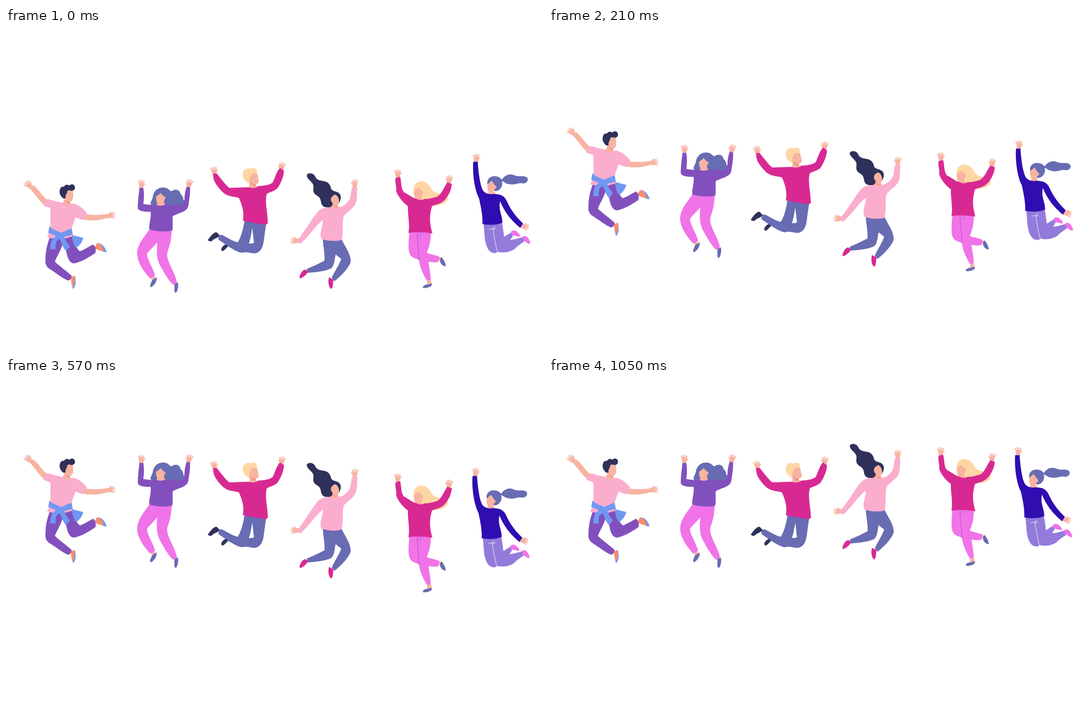
Write an HTML page that moves like this. It is 966x580 px and loops after 1.08 s.

```html
<!DOCTYPE html>
<html lang="en">
<head>
<meta charset="utf-8">
<title>Jumping friends</title>
<style>
  @property --step { syntax: "<number>"; inherits: true; initial-value: 0; }
  @keyframes tick { to { --step: 36; } }
  html, body { margin: 0; width: 100%; height: 100%; overflow: hidden; background: #fff; }
  svg { display: block; width: 966px; height: 580px; animation: tick 1080ms steps(36) infinite; }

  /* Each figure rises evenly for --n steps of 30 ms, then rests. */
  .fig {
    --x: 0;
    --p: min(1, var(--step) / var(--n));
    transform: translate(calc(var(--x) * 1px * var(--p)), calc(var(--y) * -1px * var(--p)));
  }

  .skin { fill: #f8b3a1; }
  .pink { fill: #fbadce; }
  .dark { fill: #2f315a; }
  .purple { fill: #8250bd; }
  .sky { fill: #7098f2; }
  .orange { fill: #ff8d68; }
  .slate { fill: #686cb3; }
  .orchid { fill: #f073e8; }
  .crimson { fill: #d82993; }
  .blond { fill: #fed6a4; }
  .navy { fill: #2f0db1; }
  .lilac { fill: #937bdb; }
  .shade { fill: #ef947f; }
  .seam { fill: none; stroke-width: .8; stroke-linecap: round; }
  #hand path + path { fill: none; stroke: #f8b3a1; stroke-width: 2; stroke-linecap: round; }
</style>
</head>
<body>
<svg viewBox="0 0 966 580" xmlns="http://www.w3.org/2000/svg">
  <defs>
    <g id="hand">
      <path class="skin" d="M-3.200 3C-3-1-5.200-4-4.400-8Q0-10.500 4-8C4.800-4 3-1 3.200 3Z"/>
      <path d="M-3.400-7.500L-5.400-12M-1.300-8L-2-13.500M1.100-8L1.600-13.800M3.100-7.500L4.700-12M3-4L6.200-7.500"/>
    </g>
  </defs>

  <!-- Man with a shirt tied at the waist -->
  <g class="fig" style="--y:136.500;--n:10">
    <use href="#hand" transform="translate(45.500 287) rotate(-48)"/>
    <use href="#hand" transform="translate(182 339) rotate(80) scale(-1 1)"/>
    <path class="skin" d="M43 289L49 283C58 290 66 304 76 311L71 321C60 312 53 300 43 289Z"/>
    <path class="skin" d="M139 334C150 338 168 337 183 335L185 341C170 347 150 349 132 343Z"/>
    <path class="orange" d="M116 449L124 446C126 456 124 464 121 469C117 464 118 455 116 449Z"/>
    <path class="sky" d="M124 447C126 456 126 465 121 470L119.500 468C123 463 124 455 124 447Z"/>
    <path class="orange" d="M158 397L164 387C171 390 177 396 180 403C172 403 166 399 158 397Z"/>
    <path class="sky" d="M166 387C174 389 179 396 181 404L174 403C178 400 173 393 166 387Z"/>
    <path class="purple" d="M79 376C74 390 71 402 71 417C70 427 74 431 80 435C91 442 102 451 112 455Q118 453 118 446C108 437 95 428 88 421C91 412 97 404 101 392L105 386C109 400 109 424 123 424C137 421 151 412 161 405Q163 396 157 390C148 394 140 400 133 402C126 398 125 386 121 376Z"/>
    <path class="pink" d="M75 308C85 311 92 313 99 314C107 319 115 320 120 316C131 318 139 325 146 334C143 338 141 343 138 346L125 341C123 349 119 355 118 363L121 374C107 382 88 381 74 377C77 371 80 366 80 360V329L79 324L67 320C69 315 71 311 75 308Z"/>
    <g class="sky">
      <path d="M119 373C126 375 133 376 139 378C137 387 131 393 126 396C121 390 119 382 119 373Z"/>
      <path d="M118 361L120 372C112 375 106 375 102 377C96 380 90 384 90 387L89 399L79 398C80 391 81 385 83 381C91 372 104 366 118 361Z"/>
      <path d="M78 357C85 365 97 366 104 372C106 382 110 387 115 393L108 402C102 395 100 386 96 379C90 374 83 371 76 369Z"/>
    </g>
    <path class="skin" d="M105 303L115 308C113 312 114 315 118 317C114 321 105 320 101 315C105 312 105 308 105 303Z"/>
    <path class="shade" d="M107 309Q110 314 116 313L114 316Q108 315 107 309Z"/>
    <path class="skin" d="M106 295C109 289 119 289 120 293C122 303 121 312 115 313C109 313 106 307 106 295Z"/>
    <path class="dark" d="M103 307C98 303 95 297 97 291C98 286 102 285 104 286C106 282 111 281 114 284C117 280 123 281 124 286C125 291 121 294 117 293C112 291 109 294 110 297C107 300 107 304 107 307Z"/>
  </g>

  <!-- Woman in the purple sweater -->
  <g class="fig" style="--y:135;--n:15">
    <use href="#hand" transform="translate(243.500 288)"/>
    <use href="#hand" transform="translate(328 287) rotate(14) scale(-1 1)"/>
    <path class="slate" d="M261 319C258 313 264 309 264 304C266 291 277 285 288 288C293 290 295 294 298 294C304 289 313 291 314 299C318 302 319 306 319 309C325 313 321 322 312 320L295 323Z"/>
    <path class="skin" d="M273 309L284 309Q283 316 288 319Q279 325 270 319Q274 316 273 309Z"/>
    <path class="skin" d="M270 306C269 302 275 302 278 297C280 300 283 301 284 304C287 302 288 307 285 309C284 315 281 319 277 319C272 318 270 312 270 306Z"/>
    <path class="skin" d="M259 450L266 446L269 451L264 455ZM301 461L307 457L309 461L304 464Z"/>
    <path class="slate" d="M263 454Q267 452 271 449C272 455 268 463 261 467Q258 466 260 461ZM303 461Q306 460 309 458C311 464 309 473 306 477Q302 477 303 469Z"/>
    <path class="orchid" d="M259 361C252 373 235 389 236 408C237 424 248 438 258 450Q265 451 268 445C263 429 252 414 254 406C259 399 267 393 272 386C271 403 270 417 279 431C286 444 293 455 300 462Q307 462 307 455C302 437 288 419 290 405C295 391 298 379 298 363Z"/>
    <path class="purple" d="M240 288L247 288C249 299 248 309 247 317L263 319C269 317 272 320 278 320C282 320 285 318 290 318L310 319C320 320 320 316 321 310C321 302 322 294 325 286L331 287C332 298 329 313 328 320C326 332 309 333 300 339C299 348 301 357 299 365Q280 369 258 363C256 354 262 343 260 331C252 331 238 331 237 324C237 311 239 299 240 288Z"/>
  </g>

  <!-- Man in the crimson sweater -->
  <g class="fig" style="--y:100;--n:19">
    <use href="#hand" transform="translate(375.500 264) rotate(-10)"/>
    <use href="#hand" transform="translate(495 256) rotate(10) scale(-1 1)"/>
    <path class="dark" d="M363 382C368 375 374 367 379 368L385 374C380 379 374 379 370 384Q365 385 363 382ZM387 400C388 393 393 391 396 389L402 391C397 395 394 400 390 402Z"/>
    <path class="slate" fill-rule="evenodd" d="M429 346C427 362 423 376 417 386C407 384 396 376 387 372Q380 377 383 382C395 389 408 401 424 405C433 402 439 406 448 406C458 404 461 396 463 388L468 352ZM443 360L446 387Q441 389 437 388Q440 380 443 360Z"/>
    <path class="crimson" d="M373 262L379 262C387 272 396 284 402 288L432 287C441 287 449 288 453 285C464 284 475 283 480 278C484 269 487 258 493 252L500 257C500 267 494 281 488 289C481 295 472 296 469 299C465 315 471 332 471 352L468 354C455 353 440 350 426 347C429 333 425 319 419 306C409 303 399 304 390 296C381 286 371 276 373 262Z"/>
    <path class="skin" d="M437 272L450 279Q448 284 453 286Q444 290 437 287Q439 281 437 272Z"/>
    <path class="shade" d="M439 276Q442 281 450 282L448 285Q440 283 439 276Z"/>
    <path class="skin" d="M437 267C438 260 451 260 452 263L455 277C452 283 444 282 441 278C436 276 435 271 437 267Z"/>
    <path class="blond" d="M438 280C430 277 425 270 426 263C426 253 436 251 440 254C445 251 451 253 451 257C453 259 451 263 447 261C442 263 440 264 440 268C437 268 438 274 438 280Z"/>
  </g>

  <!-- Woman with long dark hair -->
  <g class="fig" style="--y:143;--n:25">
    <use href="#hand" transform="translate(627 287) rotate(4) scale(-1 1)"/>
    <use href="#hand" transform="translate(526.500 383.500) rotate(-88)"/>
    <path class="dark" d="M541 265C543 260 553 261 556 267C559 275 567 275 573 276C581 278 584 284 585 290C589 296 599 293 602 302C604 311 597 319 590 323L576 323C568 322 567 316 566 310C564 302 558 303 554 297C551 291 555 286 552 281C549 275 541 272 541 265Z"/>
    <path class="skin" d="M588 312L597 315Q595 320 600 323Q591 329 582 323Q589 321 588 312Z"/>
    <path class="shade" d="M588 318Q591 322 597 320L596 322Q590 324 588 318Z"/>
    <path class="skin" d="M585 312C583 306 587 302 592 300C598 302 601 311 598 317C595 323 589 321 587 315Z"/>
    <path class="crimson" d="M528 450C528 444 533 436 538 435L544 438C541 444 535 449 530 451ZM581 449L589 453C588 460 589 467 585 470C580 467 579 456 581 449Z"/>
    <path class="slate" d="M570 379C570 393 574 405 573 419C562 425 551 430 541 434L543 441C558 440 575 438 585 433C591 428 591 416 593 408L603 416C599 427 591 439 586 450L591 456C604 446 618 430 620 421C621 407 609 393 603 379Z"/>
    <path class="pink" d="M622 288L632 287C631 297 633 313 626 321C619 329 608 335 607 341C604 354 608 369 603 382Q587 386 567 380C563 368 571 355 570 346C558 354 543 378 529 389L523 383C535 371 549 345 560 332C566 324 576 323 585 323Q592 327 599 323C610 321 619 311 620 302Z"/>
  </g>

  <!-- Woman with long blond hair -->
  <g class="fig" style="--y:130;--n:30">
    <use href="#hand" transform="translate(705 269) rotate(-2)"/>
    <use href="#hand" transform="translate(796.500 280) rotate(8) scale(-1 1)"/>
    <path class="blond" d="M734 301C731 291 733 277 747 276C760 277 762 285 767 292C774 301 790 295 795 306C796 314 783 320 771 320L748 314Z"/>
    <path class="skin" d="M735 300L747 302Q746 308 750 309Q742 314 734 308Q737 306 735 300Z"/>
    <path class="skin" d="M734 298C733 292 739 290 741 287C744 291 748 291 749 293C752 296 749 300 747 302C746 307 742 309 738 308C735 306 734 302 734 298Z"/>
    <path class="skin" d="M758 454L764 453L766 461L757 464ZM777 416L783 412L785 420L781 421Z"/>
    <path class="slate" d="M750 466C753 461 760 463 766 460Q767 464 763 466C758 468 754 469 750 468ZM781 415L784 413C788 418 791 424 791 429C787 430 782 425 781 421Z"/>
    <path class="orchid" d="M726 365C724 387 722 403 729 411C733 415 739 415 743 418C744 431 751 444 757 455L764 454C764 441 761 431 760 421C767 422 773 423 778 421L780 412C773 409 765 408 757 405C762 393 765 380 764 365Z"/>
    <path class="seam" stroke="#ad4ac2" d="M740 369C739 383 743 402 743 418M747 369Q746 374 742 375"/>
    <path class="crimson" d="M701 270L709 268C712 280 710 289 716 296C725 300 732 307 739 308Q746 312 753 308C762 308 770 306 777 303C785 297 788 286 794 278L802 281C801 295 792 309 784 314C775 319 767 319 766 322C762 337 761 348 767 370Q745 366 724 369C727 351 722 335 723 321C713 314 704 301 702 294C703 284 699 278 701 270Z"/>
  </g>

  <!-- Woman with a ponytail -->
  <g class="fig" style="--x:-2;--y:102;--n:30">
    <use href="#hand" transform="translate(846 241)"/>
    <use href="#hand" transform="translate(926.500 356) rotate(105) scale(-1 1)"/>
    <path class="slate" d="M866 281C864 272 872 266 880 267C887 267 890 271 892 273C898 264 907 262 914 265C922 269 931 265 937 269C941 273 938 280 930 280C921 278 915 284 905 281C898 281 895 275 892 276C895 285 888 294 880 294Z"/>
    <path class="skin" d="M869 290L878 290Q877 297 882 299Q874 304 866 298Q870 296 869 290Z"/>
    <path class="skin" d="M866 284C867 279 871 278 874 275C876 279 879 282 880 284C883 284 883 290 879 290C878 295 875 298 871 297C867 295 865 289 866 284Z"/>
    <path class="orchid" d="M908 368C910 364 916 364 919 367C923 370 927 375 923 376C917 374 914 375 909 372ZM928 378C930 374 935 374 938 377C941 381 945 387 942 389C937 388 934 384 929 382Z"/>
    <path class="lilac" d="M859 352C861 369 860 386 867 398C871 405 879 408 885 403C896 406 908 403 915 398C921 392 926 388 932 385L929 377C921 379 914 381 907 382L912 374L908 369C903 371 899 375 896 376C895 368 894 359 892 350Z"/>
    <path class="seam" stroke="#fff" d="M876 362C878 377 881 391 884 403M869 363L876 361L880 358M876 362L881 362"/>
    <path class="navy" d="M840.500 241L848.500 241C850 261 853 286 859 294C864 299 871 300 877 299C890 299 897 302 902 314C908 328 920 343 930 352L925 360C910 348 896 331 889 312C885 327 893 337 893 351Q876 357 857 353C858 339 854 321 851 307C843 292 839 264 840.500 241Z"/>
  </g>
</svg>
</body>
</html>
```
